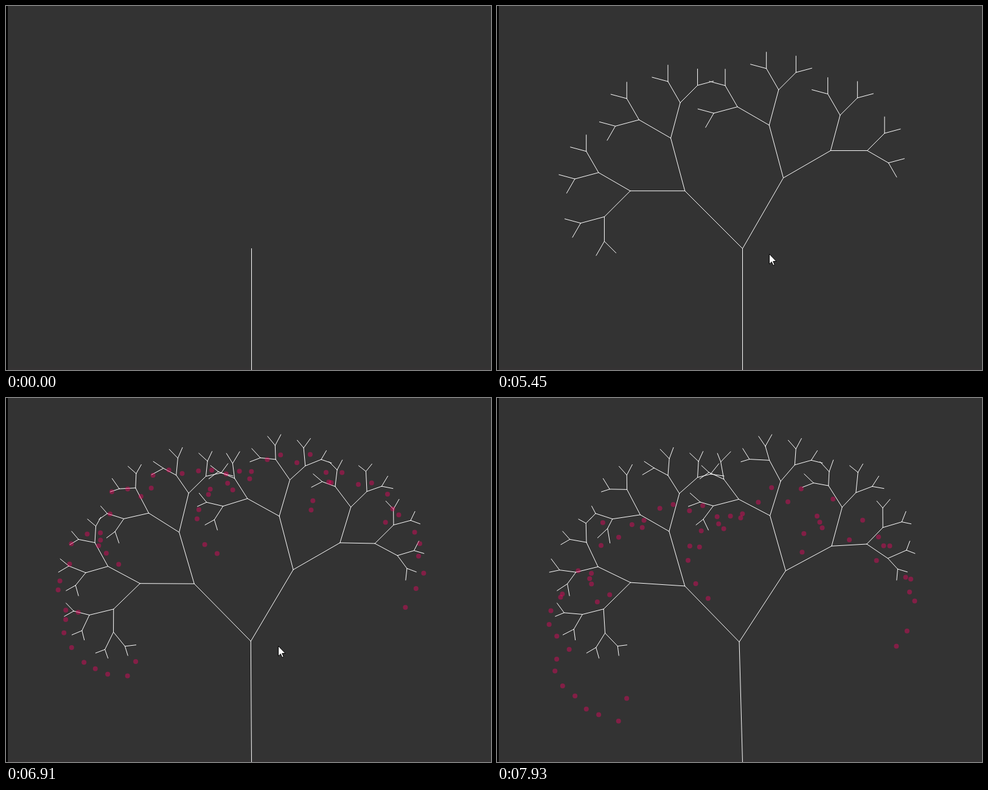
These frames come from a looping animation (797 px wide and 598 px high, 8000 ms). An HTML page:

```html
<!DOCTYPE html>
<html lang="en">
<head>
<meta charset="utf-8">
<title>Fractal tree</title>
<style>
  html, body { margin: 0; width: 100%; height: 100%; overflow: hidden; background: #333; }
  svg { display: block; width: 100vw; height: 100vh; }
</style>
</head>
<body>
<svg viewBox="0 0 797 598">
  <rect width="797" height="598" fill="#333"/>
  <rect y="594" width="797" height="4" fill="#353334"/>
  <rect width="3" height="598" fill="#000"/>
  <path id="tree" fill="none" stroke="#fff" stroke-linecap="round"/>
  <g id="leaves" fill="#ff0064" fill-opacity=".392"></g>
  <path id="cursor" d="M0 0V16.5L3.8 12.9L6.4 18.8L8.8 17.8L6.3 12H11.5Z" fill="#fff" stroke="#000"/>
</svg>
<script>
const LOOP = 8000, SHAKE = 6300, STEPS = 21;
const GROW = [2080, 2990, 3670, 4590, 5450, SHAKE];
const TIPS = 2 ** GROW.length;
const FALL = 4.5; // mean leaf drop per step

// Where the trunk top and the two main forks drift to
const LEAN = { 1: [-6, 3], 2: [0, 5], 3: [3, 1.5] };

const ENTER = [672.5, 588.5], HALT = [451.5, 405.5];
const REST = [447.5, 407.5], EXIT = [690.5, 592.5];

const $ = id => document.getElementById(id);
const mix = (a, b, u) => a.map((v, i) => v + (b[i] - v) * u);

// Repeatable noise in -1..1
function noise(a, b) {
  const v = Math.sin(a * 12.9898 + b * 78.233) * 43758.5453;
  return (v - Math.floor(v)) * 2 - 1;
}

// Random walk: the sum of the noise up to a step
function walk(seed, step) {
  let sum = 0;
  for (let k = 1; k <= step; k++) sum += noise(seed, k);
  return sum;
}

// Binary heap: joint n has the left child 2n and the right child 2n + 1
const joints = [{ x: 403.5, y: 598.5 }];
for (let n = 1; n < 2 * TIPS; n++) {
  const from = joints[n >> 1];
  const turn = n === 1 ? 0 : from.turn + (n % 2 ? 30 : -45);
  const len = 200 * 0.67 ** Math.floor(Math.log2(n));
  const rad = turn * Math.PI / 180;
  joints[n] = { turn, x: from.x + len * Math.sin(rad), y: from.y - len * Math.cos(rad) };
}

const leaves = joints.slice(TIPS).map(tip => {
  const dot = document.createElementNS('http://www.w3.org/2000/svg', 'circle');
  dot.setAttribute('r', 4);
  dot.setAttribute('cx', tip.x - .5);
  return $('leaves').appendChild(dot);
});

// The shaking pauses for a moment after step 10
function shakeStep(t) {
  if (t < SHAKE) return 0;
  return t < 7170
    ? Math.min(10, Math.floor((t - SHAKE) / 77))
    : Math.min(STEPS, 11 + Math.floor((t - 7164) / 76));
}

// The root and the tips stay in place
function jointAt(n, step) {
  const { x, y } = joints[n];
  if (!n || n >= TIPS || !step) return [x, y];
  const shift = axis => LEAN[n]
    ? LEAN[n][axis] * step / STEPS + noise(2 * n + axis, step)
    : walk(2 * n + axis, step);
  return [x + shift(0), y + shift(1)];
}

function drawTree(t, step) {
  const depth = GROW.filter(g => t >= g).length;
  const pts = joints.slice(0, 2 ** (depth + 1)).map((p, n) => jointAt(n, step));
  const lines = pts.slice(1).map((p, i) => `M${pts[(i + 1) >> 1]}L${p}`);
  $('tree').setAttribute('d', lines.join(''));
}

function drawLeaves(t, step) {
  $('leaves').style.display = t < SHAKE ? 'none' : '';
  leaves.forEach((dot, i) => {
    const fall = FALL * (step + walk(2 * TIPS + i, step));
    dot.setAttribute('cy', joints[TIPS + i].y - .5 + fall);
  });
}

function cursorAt(t, step) {
  if (t < 130 || step > 12) return null;
  if (t < 1380) {
    const u = Math.min(6, Math.floor((t - 130) / 78.3)) / 6;
    return mix(ENTER, HALT, 1 - (1 - u) ** 2);
  }
  if (t < 1460) return mix(HALT, REST, .5);
  return mix(REST, EXIT, Math.max(0, step - 8) / 4);
}

function drawCursor(t, step) {
  const pos = cursorAt(t, step);
  $('cursor').style.display = pos ? '' : 'none';
  if (pos) $('cursor').setAttribute('transform', `translate(${pos})`);
}

function draw(t) {
  const step = shakeStep(t);
  drawTree(t, step);
  drawLeaves(t, step);
  drawCursor(t, step);
}

const start = performance.now();
function tick() {
  draw((performance.now() - start) % LOOP);
  requestAnimationFrame(tick);
}
tick();
</script>
</body>
</html>
```
